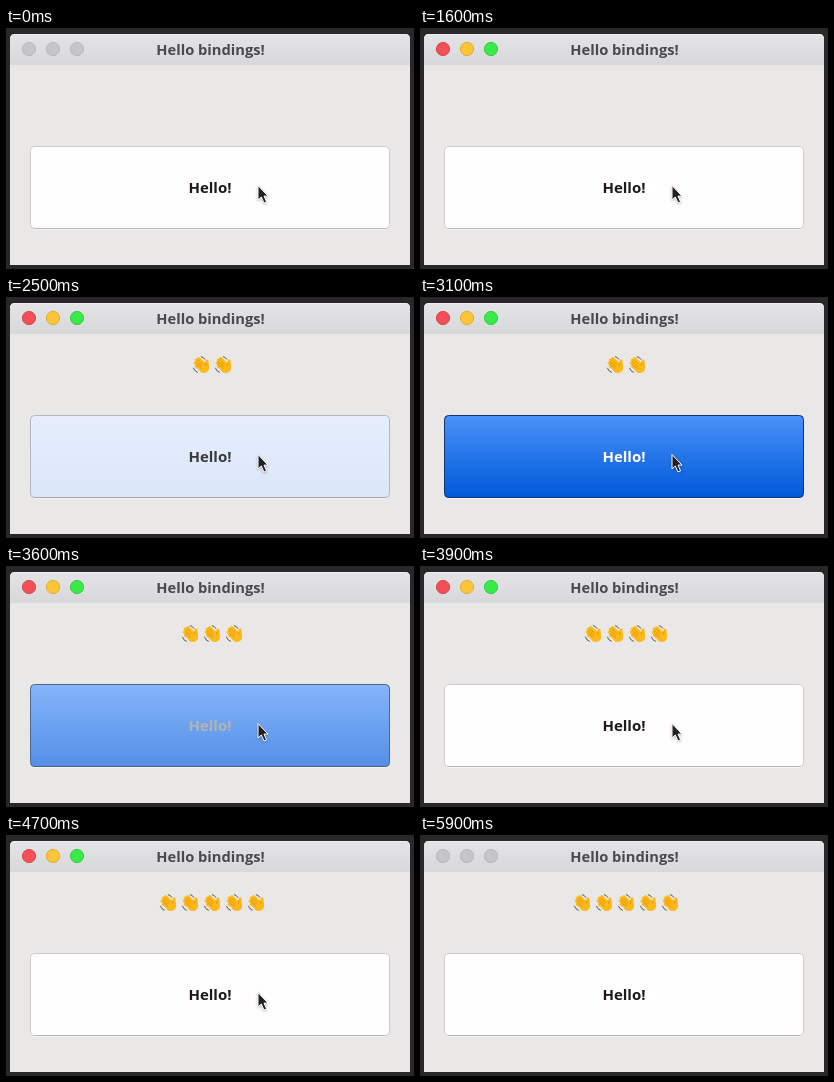
Recreate the animation shown at these times as an HTML page. Size 408x241 px, loop 6000 ms.

```html
<!DOCTYPE html>
<html lang="en">
<head>
<meta charset="utf-8">
<title>Hello bindings!</title>
<style>
html, body { margin: 0; width: 100%; height: 100%; overflow: hidden; background: #292729; }
svg { display: block; width: 408px; height: 241px; }
text { font-family: "Open Sans", "Noto Sans", sans-serif; font-weight: 700; text-anchor: middle; }
</style>
</head>
<body>
<svg viewBox="0 0 408 241">
  <defs>
    <linearGradient id="bar" x2="0" y2="1">
      <stop stop-color="#e4e3e5"/><stop offset="1" stop-color="#d8d7da"/>
    </linearGradient>
    <linearGradient id="face" x2="0" y2="1">
      <stop id="top"/><stop id="bottom" offset="1"/>
    </linearGradient>
    <g id="hand" fill="none" stroke-linecap="round">
      <g stroke="#fdb91a" stroke-width="3">
        <circle cx="2.8" cy="3" r="3.9" fill="#fdb91a"/>
        <path d="M3-1-2.3-6.2M2 1-4.8-4.7M1 3-5.8-1.7M1 5-4.6 1.5M6.5 2 6-3.8"/>
      </g>
      <path d="M1.5-.6-3.2-5M.6 1.4-4.8-3M.2 3.6-4.6 0M4.6.8Q4.6-1 5-2" stroke="#d58c08" stroke-width=".7"/>
      <path d="M-7.5 3.5Q-6.7 6.6-3.6 7.6M.3-8Q2.7-7.6 3.8-5.4" stroke="#5b5750" stroke-width="1"/>
    </g>
  </defs>

  <path d="M4 237V11Q4 6 9 6H399Q404 6 404 11V237Z" fill="#e9e8e7"/>
  <path d="M4 37V11Q4 6 9 6H399Q404 6 404 11V37Z" fill="url(#bar)"/>
  <path d="M8 6.5H400" stroke="#f0eff0"/>
  <g id="lights"></g>
  <text x="204.5" y="27" font-size="14.7" fill="#4a494b">Hello bindings!</text>

  <g id="hands"></g>

  <path d="M28 201.5H380" stroke="#f5f4f4"/>
  <rect id="button" x="24.5" y="118.5" width="359" height="82" rx="4" fill="url(#face)"/>
  <path id="edge" d="M28 200.5H380"/>
  <text id="label" x="204" y="165" font-size="15">Hello!</text>

  <path id="cursor" d="M0 0V14.5L3.3 11.5 6 17.5 8.6 16.4 6 10.6H10Z"
    fill="#222123" stroke="#fff" stroke-width="1" style="filter:drop-shadow(0 1px 1px #0004)"/>
</svg>
<script>
const LOOP = 6000;
const $ = id => document.getElementById(id);

// [start ms, press amount, hands shown]
const steps = [
  [0, 0, 0], [1700, .67, 0], [1800, 0, 1],
  [2300, .67, 1], [2400, 1, 1], [2500, .14, 2], [2600, 0, 2],
  [3000, .67, 2], [3100, 1, 2], [3200, .14, 3], [3300, 0, 3],
  [3600, .67, 3], [3700, 1, 3], [3800, .14, 4], [3900, 0, 4],
  [4500, .67, 4], [4600, .14, 5], [4700, 0, 5]
];

const mix = (a, b, k) => `rgb(${a.map((v, i) => Math.round(v + (b[i] - v) * k))})`;
const white = [255, 253, 254];

function drawLights(active) {
  const fills = active ? ["#f25056", "#fac536", "#39ea49"] : Array(3).fill("#c6c5c7");
  const rims = active ? ["#d9484e", "#dfae30", "#33cf42"] : Array(3).fill("#b7b6b8");
  $("lights").innerHTML = fills.map((fill, i) =>
    `<circle cx="${23 + 24 * i}" cy="21" r="6.6" fill="${fill}" stroke="${rims[i]}"/>`).join("");
}

function drawHands(count) {
  let out = "";
  for (let i = 0; i < count; i++)
    out += `<use href="#hand" x="${206 + 22 * (i - (count - 1) / 2)}" y="67.7"/>`;
  $("hands").innerHTML = out;
}

function drawButton(press) {
  $("top").setAttribute("stop-color", mix(white, [73, 145, 249], press));
  $("bottom").setAttribute("stop-color", mix(white, [0, 89, 218], press));
  $("button").setAttribute("stroke", mix([205, 203, 205], [20, 52, 110], press));
  $("edge").setAttribute("stroke", mix([184, 182, 184], [20, 52, 110], press));
  $("label").setAttribute("fill", mix([26, 26, 28], [255, 255, 255], press));
}

function drawCursor(t) {
  const [x, y] = t < 5300 ? [252, 157.5] : [257, 76];
  $("cursor").setAttribute("transform", `translate(${x} ${y})`);
  $("cursor").setAttribute("visibility", t < 5400 ? "visible" : "hidden");
}

function frame(now) {
  const t = now % LOOP;
  const [, press, count] = steps.findLast(step => step[0] <= t);
  drawLights(t >= 1600 && t < 5900);
  drawHands(count);
  drawButton(press);
  drawCursor(t);
  requestAnimationFrame(frame);
}

const start = performance.now();
frame(0);
requestAnimationFrame(function sync() {
  const raf = window.requestAnimationFrame;
  frame = () => {
    const t = Math.max(0, performance.now() - start) % LOOP;
    const [, press, count] = steps.findLast(step => step[0] <= t);
    drawLights(t >= 1600 && t < 5900);
    drawHands(count);
    drawButton(press);
    drawCursor(t);
    raf(frame);
  };
  frame();
});
</script>
</body>
</html>
```
